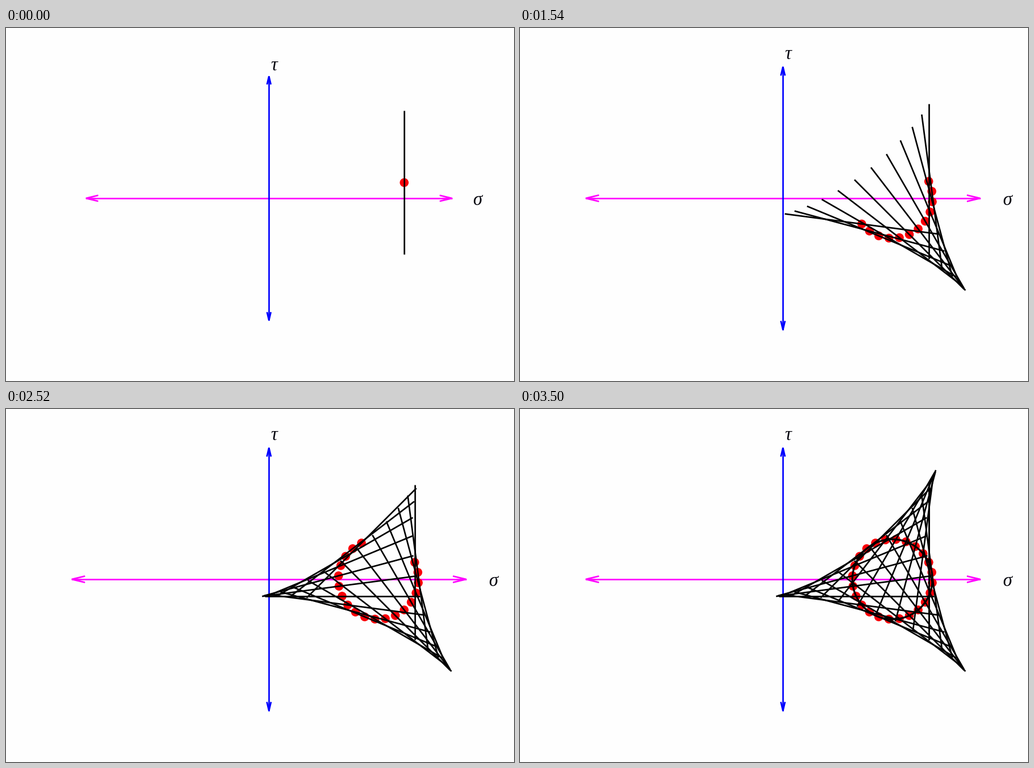
A matplotlib script that plays this animation: 897 by 624 pixels, repeating every 3640 ms.

```python
import matplotlib.pyplot as plt
import numpy as np
from matplotlib.animation import FuncAnimation

W, H, DPI = 897, 624, 64
PT = 72 / DPI                     # points per pixel
ORIGIN = np.array([464.3, 301.0])
CENTER = np.array([193.3, 0.0])   # circle centre relative to the origin
RADIUS = 70.7
HALF_CHORD = 137
START, STEP = 25, 15              # degrees
FRAMES, INTERVAL = 26, 140

fig = plt.figure(figsize=(W / DPI, H / DPI), dpi=DPI, facecolor="#fefefe")
ax = fig.add_axes([0, 0, 1, 1])


def stroke(points, color, width=2.7, zorder=3, **style):
    x, y = np.transpose(points)
    ax.plot(x, y, color=color, lw=width * PT, zorder=zorder,
            solid_capstyle="butt", **style)


def double_arrow(direction, length, head, spread, color, zorder):
    along = np.array(direction, float)
    across = along[::-1]
    tip = along * length
    stroke([ORIGIN - tip, ORIGIN + tip], color, zorder=zorder)
    for sign in (-1, 1):
        base = sign * (tip - along * head)
        wings = [base - across * spread, sign * tip, base + across * spread]
        stroke(ORIGIN + np.array(wings), color, zorder=zorder,
               solid_joinstyle="bevel")


def label(x, y, text):
    ax.text(x, y, text, family="Liberation Serif", style="italic",
            size=33 * PT, color="#080810", ha="center", va="baseline")


def unit(degrees):
    a = np.radians(degrees)
    return np.array([np.cos(a), -np.sin(a)])


def draw(i):
    ax.clear()
    ax.set(xlim=(0, W), ylim=(H, 0))
    ax.axis("off")
    scale = 0.928 if i == 0 else 1

    double_arrow((1, 0), 348.3 * scale, 23.5 * scale, 5.6 * scale, "#ff00ff", 1)
    double_arrow((0, 1), 232.5 * scale, 15.7 * scale, 3.7 * scale, "#0000ff", 1.5)
    label(473.5, 75 if i == 0 else 55, "τ")
    label(832 if i == 0 else 860, 313, "σ")

    for k in range(min(i, 24) + 1):
        dot = ORIGIN + scale * (CENTER + RADIUS * unit(START - STEP * k))
        reach = scale * HALF_CHORD * unit(90 + STEP * k / 2)
        ax.add_patch(plt.Circle(dot, 7.8, fc="#fa0008", ec="none", zorder=2))
        stroke([dot - reach, dot + reach], "black")

    if i == FRAMES - 1:
        ax.add_patch(plt.Circle(ORIGIN + CENTER, RADIUS, fill=False,
                                ec="black", lw=3.3 * PT, zorder=4))
    return ax.get_children()


anim = FuncAnimation(fig, draw, frames=FRAMES, interval=INTERVAL,
                     init_func=lambda: draw(0), repeat=True, repeat_delay=0)
plt.show()
```
